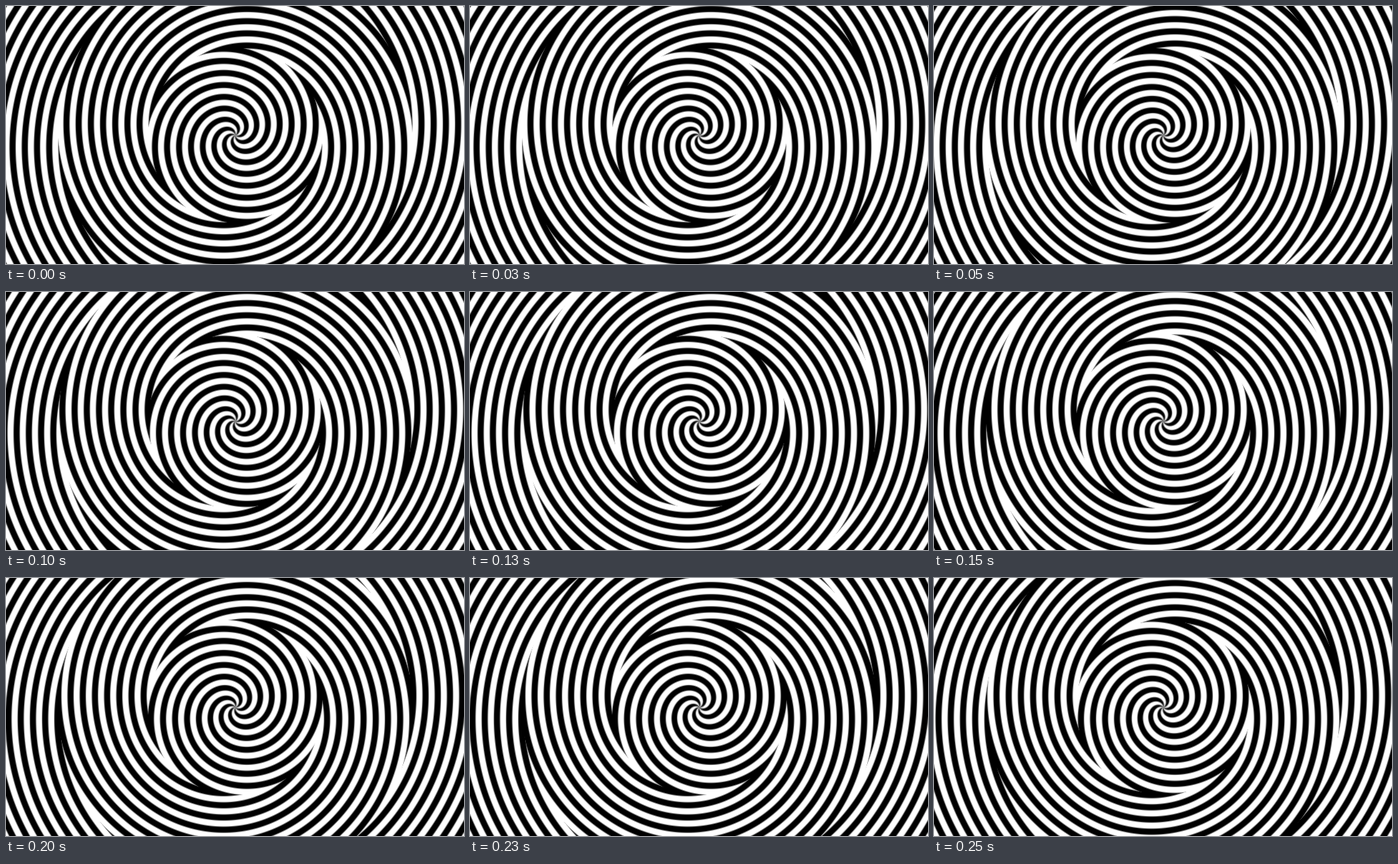
Write an HTML page with a canvas that moves like this. It is 640 px wide and 360 px high and loops after 300 ms.

```html
<!DOCTYPE html>
<html lang="en">
<head>
<meta charset="utf-8">
<title>Folded spiral</title>
<style>
  html, body { margin: 0; width: 100%; height: 100%; overflow: hidden; background: #fff; }
  canvas { display: block; width: 640px; height: 360px; }
</style>
</head>
<body>
<canvas id="stage" width="640" height="360"></canvas>
<script>
const W = 640, H = 360, TAU = 2 * Math.PI;
const ARMS = 6, PITCH = 17.1;          // arm count, radial stripe period
const CX = 320.5, CY = 180.5;
const INNER = 122, OUTER = 247.5;      // radii where the winding reverses
const START = 52 * Math.PI / 180;      // angle of a white arm on the inner fold
const STEPS = 6, STEP_MS = 50;

const ctx = document.getElementById('stage').getContext('2d');
const image = ctx.createImageData(W, H);
const pixels = new Uint32Array(image.data.buffer);
const phase = new Float32Array(W * H);
const edge = new Float32Array(W * H);  // turns phase distance into pixels

function foldRadius(r) {
  const span = OUTER - INNER;
  return span - Math.abs(Math.abs(r - INNER) - span);
}

for (let y = 0, i = 0; y < H; y++) {
  for (let x = 0; x < W; x++, i++) {
    const dx = x + 0.5 - CX, dy = y + 0.5 - CY;
    const r = Math.max(Math.hypot(dx, dy), 0.5);
    phase[i] = ARMS * (Math.atan2(dy, dx) - START) - TAU * foldRadius(r) / PITCH;
    edge[i] = 1 / Math.hypot(TAU / PITCH, ARMS / r);
  }
}

// The whole figure turns counterclockwise by one arm per loop.
function draw(step) {
  const turn = TAU * step / STEPS;
  for (let i = 0; i < pixels.length; i++) {
    const light = 0.5 + 0.5 * Math.cos(phase[i] + turn) * edge[i];
    const v = Math.round(255 * Math.min(1, Math.max(0, light)));
    pixels[i] = 0xff000000 | v << 16 | v << 8 | v;
  }
  ctx.putImageData(image, 0, 0);
}

const begin = performance.now();
let shown = -1;

function tick() {
  const step = Math.floor((performance.now() - begin) / STEP_MS) % STEPS;
  if (step !== shown) draw(shown = step);
  requestAnimationFrame(tick);
}
tick();
</script>
</body>
</html>
```
